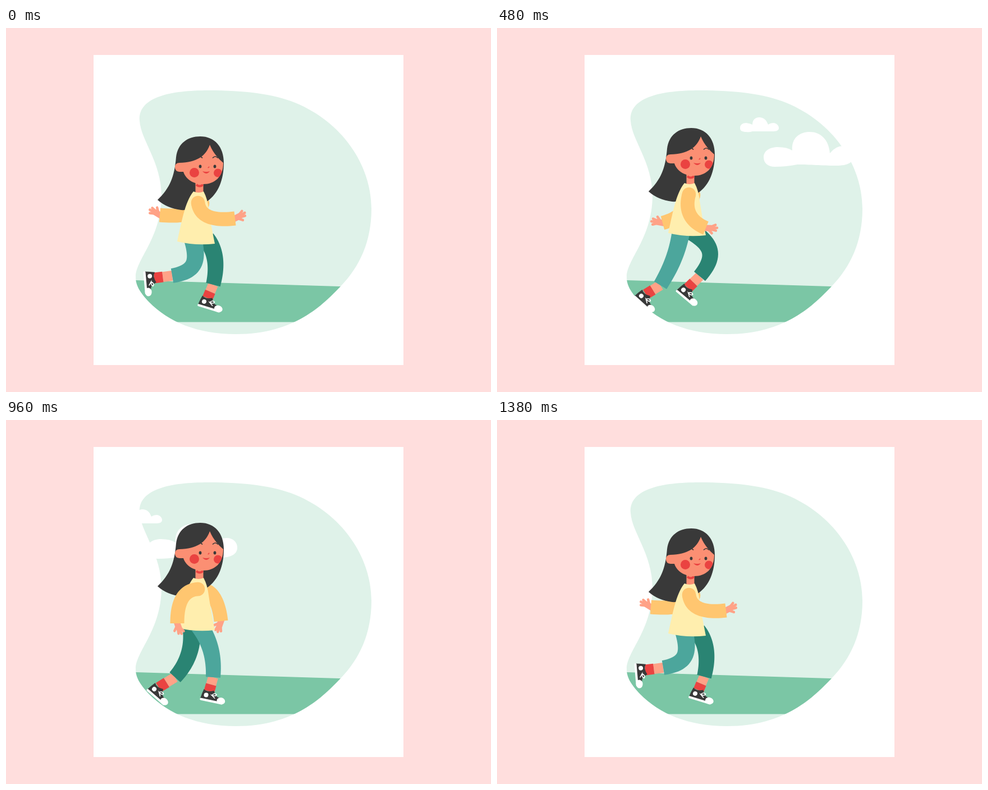
An HTML page with a canvas for the animation above (1440 ms loop, 864 px wide and 648 px high).

```html
<!DOCTYPE html>
<html lang="en">
<head>
<meta charset="utf-8">
<title>Walking girl</title>
<style>
html, body { margin: 0; height: 100%; overflow: hidden; background: #ffdedd; }
canvas { display: block; }
</style>
</head>
<body>
<canvas width="864" height="648"></canvas>
<script>
const ctx = document.querySelector('canvas').getContext('2d');
const STEP = 60, FRAMES = 24, CYCLE = 12;
const INK = '#393939', SKIN = '#ffa287', FACE = '#fb8f73', RED = '#ea4341';
const NEAR = '#4ca69c', FAR = '#2a8473', SLEEVE = '#ffc670';

const blob = new Path2D('M238 165C235 122 295 111 360 111C425 111 475 117 515 133C598 167 651 243 651 322C651 380 630 425 596 460C565 492 515 545 410 545C340 545 290 523 255 488C238 470 231 458 231 443C231 412 276 375 277 300C277 238 240 200 238 165Z');
const ground = new Path2D('M220 448.6L660 462V523.5H220Z');
const bigCloud = new Path2D('M475 230C475 218 487 212 500 212Q517 212 526 218C524 195 540 185 557 185C576 185 591 198 593 223Q603 210 617 210C629 210 636 218 636 227C636 239 625 245 605 245C575 245 560 243 535 243Q515 247 495 247C482 247 475 240 475 230Z');
const smallCloud = new Path2D('M433 178C433 172 438 169 444 169Q451 170 455 172C455 164 460 159 467 159C475 159 480 164 483 172Q487 169 493 169C499 170 502 174 502 178C502 183 497 184 490 184L455 184Q450 186 444 185C437 185 433 183 433 178Z');
const hair = new Path2D('M303 230C306 205 324 193 346 193C372 193 388 212 388 240C388 270 378 295 359 308L330 320Q320 325 312 324Q287 321 270 306C292 285 300 265 303 230Z');
const face = new Path2D('M309 240C340 239 356 228 363 208C370 224 378 232 387 240C387 265 372 278 351 278C332 278 320 268 316 256L309 256Q301 255 301 248Q301 240 309 240Z');
const sweater = new Path2D('M334 291Q343 295 352 291Q359 304 361 322Q365 350 372 384Q338 388 305 380C312 350 318 310 334 291Z');
const mouth = new Path2D('M350 255Q357 257 363 255Q357 263 350 255Z');
const shoe = new Path2D('M-10-2Q-3 3 8-3L12 4Q16 8 24 8V16H-13Q-12 6-10-2Z');

// Vertical offset of the body over one step
const bob = [0, -4, -15, -15, -10, 0];

// Hip x, two curve handles, trouser cuff, ankle, shoe angle; one full stride
const back = [333, 343, 415, 338, 434, 296, 441, 264, 445, 85];
const front = [357, 374, 396, 377, 425, 369, 457, 359, 481, 17];
const stride = [
  back,
  [352, 385, 408, 378, 427, 338, 440, 303, 445, 75],
  [345, 383, 385, 392, 405, 361, 442, 340, 463, 40],
  [346, 378, 388, 388, 412, 372, 450, 362, 474, 25],
  [344, 365, 395, 371, 425, 369, 458, 362, 483, 12],
  front,
  front,
  [334, 337, 405, 326, 435, 318, 458, 297, 481, 28],
  [328, 322, 400, 308, 430, 291, 458, 265, 474, 42],
  [328, 328, 400, 308, 430, 285, 455, 254, 471, 50],
  [330, 335, 405, 322, 435, 301, 458, 272, 476, 41],
  back
];

// Arm curves relative to the body, along the swing
const nearArm = [
  [310, 313, 305, 345, 305, 372],
  [315, 325, 322, 360, 334, 380],
  [325, 334, 328, 359, 352, 381],
  [334, 340, 345, 360, 372, 371],
  [345, 335, 368, 344, 408, 339]
];
const farArm = [
  [370, 313, 380, 340, 383, 368],
  [345, 325, 340, 345, 335, 362],
  [335, 330, 320, 350, 322, 370],
  [345, 335, 325, 354, 295, 362],
  [345, 330, 320, 337, 274, 333]
];
const swing = [4, 3.1, 1.8, .7, 0, 1, 1, 2, 3, 3.5, 3.85, 4];

function fill(path, color) {
  ctx.fillStyle = color;
  ctx.fill(path);
}

function oval(x, y, rx, ry, color) {
  ctx.beginPath();
  ctx.ellipse(x, y, rx, ry, 0, 0, 7);
  ctx.fillStyle = color;
  ctx.fill();
}

function line(d, width, color, cap = 'round') {
  ctx.lineWidth = width;
  ctx.lineCap = cap;
  ctx.strokeStyle = color;
  ctx.stroke(new Path2D(d));
}

function at(x, y, angle, draw) {
  ctx.save();
  ctx.translate(x, y);
  ctx.rotate(angle);
  draw();
  ctx.restore();
}

// Tapered tube along a cubic curve
function limb([x0, y0, x1, y1, x2, y2, x3, y3], w0, w1, color) {
  const left = [], right = [];
  for (let i = 0; i <= 24; i++) {
    const s = i / 24, r = 1 - s;
    const point = (a, b, c, d) => r * r * r * a + 3 * r * r * s * b + 3 * r * s * s * c + s * s * s * d;
    const slope = (a, b, c, d) => r * r * (b - a) + 2 * r * s * (c - b) + s * s * (d - c);
    const x = point(x0, x1, x2, x3), y = point(y0, y1, y2, y3);
    const dx = slope(x0, x1, x2, x3), dy = slope(y0, y1, y2, y3);
    const k = (w0 + (w1 - w0) * s) / 2 / Math.hypot(dx, dy);
    left.push([x - dy * k, y + dx * k]);
    right.unshift([x + dy * k, y - dx * k]);
  }
  ctx.beginPath();
  for (const [x, y] of [...left, ...right]) ctx.lineTo(x, y);
  ctx.fillStyle = color;
  ctx.fill();
}

function drawShoe() {
  fill(shoe, INK);
  oval(24, 12.5, 7.5, 6, '#fff');
  line('M-11.5 16.5H26', 4, '#fff');
  oval(-4, 7.5, 4, 4, '#fff');
  line('M6 6Q10 0 14 3Q14 7 6 6L12 10', 1.6, '#fff');
}

function drawLeg([hx, x1, y1, x2, y2, cx, cy, ax, ay, angle], dy, color) {
  const mx = cx + (ax - cx) * .52, my = cy + (ay - cy) * .52;
  line(`M${cx} ${cy}L${mx} ${my}`, 18, SKIN, 'butt');
  line(`M${mx} ${my}L${ax} ${ay}`, 19, RED, 'butt');
  limb([hx, 376 + dy, x1, y1, x2, y2, cx, cy], 32, 26, color);
  at(ax, ay, angle * Math.PI / 180, drawShoe);
}

function drawHand() {
  line('M-2 0H9', 11, SKIN);
  line('M8-2L17-6M8 0L20-1M8 2L18 4M5 3L11 9', 4.5, SKIN);
}

function drawArm(poses, u, shoulder, turn) {
  const i = Math.min(3, Math.floor(u));
  const curve = poses[i].map((v, k) => v + (poses[i + 1][k] - v) * (u - i));
  const [, , x, y, ex, ey] = curve;
  at(ex, ey, Math.atan2(ey - y, ex - x) + turn, drawHand);
  oval(...shoulder, 12.3, 12.3, SLEEVE);
  limb([...shoulder, ...curve], 24.6, 25, SLEEVE);
}

function drawHead() {
  fill(face, FACE);
  ctx.save();
  ctx.clip(face);
  oval(335.5, 257.5, 8.5, 8.5, RED);
  oval(377.5, 258, 7.5, 7.5, RED);
  ctx.restore();
  oval(346, 246.5, 2.4, 3, INK);
  oval(372, 246.5, 2.4, 3, INK);
  line('M368.5 231Q373 226.5 377 231M347.5 229.5L349.5 231', 1.7, INK);
  line('M360 248.5Q362 249 361.5 247', 1.3, RED);
  fill(mouth, RED);
}

function drawGirl(frame) {
  const pose = frame % CYCLE, dy = bob[frame % bob.length];
  const body = draw => at(0, dy, 0, draw);
  body(() => {
    drawArm(farArm, swing[pose], [350, 312], .45);
    fill(hair, INK);
  });
  drawLeg(stride[(pose + 6) % CYCLE], dy, FAR);
  drawLeg(stride[pose], dy, NEAR);
  body(() => {
    line('M344.5 272V296', 14, FACE, 'butt');
    line('M339 279Q345 284 351 279', 4, RED, 'butt');
    fill(sweater, '#ffeeae');
    drawHead();
    drawArm(nearArm, swing[pose], [342, 311], -.35);
  });
}

function render(now) {
  const frame = Math.floor(now / STEP) % FRAMES;
  ctx.fillStyle = '#ffdedd';
  ctx.fillRect(0, 0, 864, 648);
  ctx.save();
  ctx.beginPath();
  ctx.rect(156, 48, 552, 552);
  ctx.fillStyle = '#fff';
  ctx.fill();
  ctx.clip();
  fill(blob, '#dff2e9');
  ctx.save();
  ctx.clip(blob);
  fill(ground, '#7bc6a5');
  ctx.restore();
  at(28 * (8 - frame), 0, 0, () => {
    fill(bigCloud, '#fff');
    fill(smallCloud, '#fff');
  });
  drawGirl(frame);
  ctx.restore();
}

const start = performance.now();
function tick() {
  render(performance.now() - start);
  requestAnimationFrame(tick);
}
tick();
</script>
</body>
</html>
```
